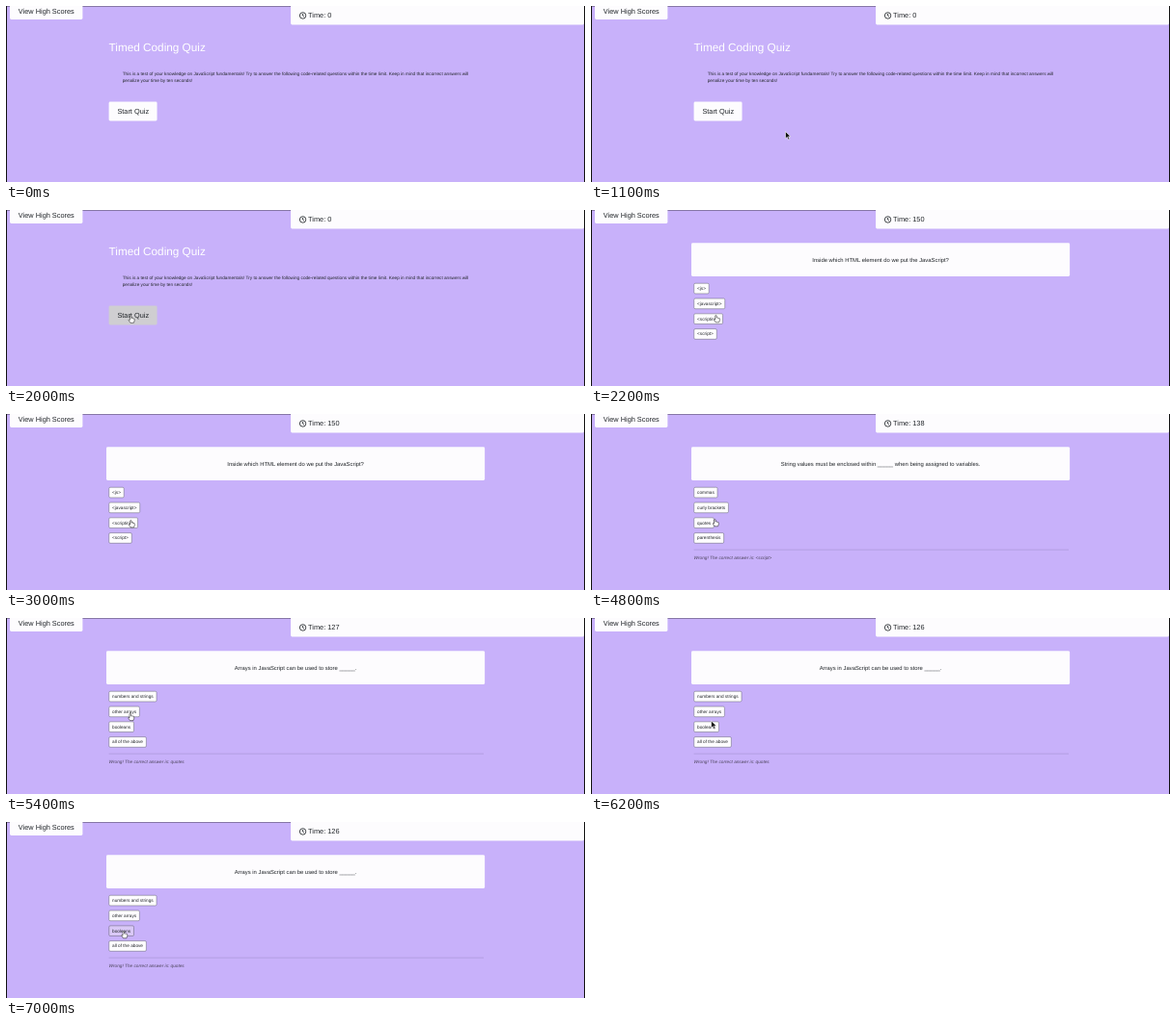
Write an HTML page that moves like this. It is 600x183 px and loops after 7.1 s.

```html
<!DOCTYPE html>
<html lang="en">
<head>
<meta charset="utf-8">
<title>Timed Coding Quiz</title>
<style>
  html, body { margin: 0; width: 100%; height: 100%; overflow: hidden; }
  #stage { position: relative; width: 600px; height: 183px; overflow: hidden; background: #c8b1fa; }
  #stage * { box-sizing: border-box; }
  #stage div, #stage svg { position: absolute; }
  #page {
    left: 0; top: 0; width: 1633px; height: 498px;
    transform: scale(.3675); transform-origin: 0 0;
    color: #212529; font: 12.8px/19.2px "Liberation Sans", Arial, sans-serif;
    text-rendering: geometricPrecision; white-space: nowrap;
  }
  #page .big { font-size: 20px; line-height: 30px; }
  .white { background: #fdfcfe; }
  .edge { top: 0; width: 1px; height: 183px; background: #111; }
  #scores { left: 11px; top: -16px; width: 205px; height: 54px; padding: 16px 0 0 24px; border-radius: 4px; }
  #timer { left: 803px; top: -5px; width: 827px; height: 58px; border-radius: 4px; }
  #time { left: 852px; top: 12px; }
  #clock { left: 826px; top: 16px; width: 22px; height: 22px; }
  h1 { position: absolute; left: 290px; top: 99px; margin: 0; font: 32px/38px "Liberation Sans", Arial, sans-serif; color: #fff; }
  #intro p { position: absolute; left: 328.5px; top: 182px; margin: 0; }
  #start { left: 290px; top: 270.5px; width: 136px; height: 54px; padding: 12px 0 0 24px; border-radius: 4px; }
  #card { left: 283px; top: 92.5px; width: 1067px; height: 95px; border-radius: 4px; text-align: center; font-size: 16px; line-height: 100px; }
  .option { left: 290px; height: 30px; padding: 0 8.5px; line-height: 28px; border: 1.5px solid #343a40; border-radius: 4px; }
  .pressed { background: #d9c8f6; }
  #rule { left: 290px; top: 383px; width: 1057px; height: 2px; background: #ab97d8; }
  #note { left: 290px; top: 397px; font-style: italic; color: #4a4258; }
  #cursor { left: 0; top: 0; overflow: visible; width: 10px; height: 12px; }
  #cursor path { fill: #fff; stroke: #222; stroke-width: .65; stroke-linejoin: round; }
  #cursor #arrow { fill: #111; stroke: #fff; stroke-width: .6; }
</style>
</head>
<body>
<div id="stage">
  <div style="left:0;top:0;width:600px;height:1px;background:#0005"></div>
  <div id="page">
    <div id="scores" class="white big">View High Scores</div>
    <div id="timer" class="white"></div>
    <svg id="clock" viewBox="0 0 8 8" fill="none" stroke="#212529" stroke-width=".85">
      <circle cx="4" cy="4" r="3.2"/><path d="M4 2V4.2L5.3 5.1"/>
    </svg>
    <div id="time" class="big"></div>

    <div id="intro">
      <h1>Timed Coding Quiz</h1>
      <p>This is a test of your knowledge on JavaScript fundamentals! Try to answer the following code-related questions within the time limit. Keep in mind that incorrect answers will<br>penalize your time by ten seconds!</p>
      <div id="start" class="big">Start Quiz</div>
    </div>

    <div id="quiz">
      <div id="card" class="white"></div>
      <div id="options"></div>
      <div id="feedback"><div id="rule"></div><div id="note"></div></div>
    </div>
  </div>

  <div class="edge" style="left:0"></div>
  <div class="edge" style="left:599px"></div>
  <svg id="cursor">
    <path id="arrow" d="M0 0V7.4L1.8 5.8L3 8.6L4.3 8L3.1 5.3H5.4Z"/>
    <path id="hand" transform="translate(.2 .5) scale(.85)" d="M-.9 .4Q0 -.6 .8 .4V3Q1.6 2.4 2.2 3.2Q3 2.7 3.5 3.5Q4.6 3.2 4.6 4.4V6L3.7 8.6H-.4L-2.5 5.4Q-2.6 4.2 -.9 5.2Z"/>
  </svg>
</div>
<script>
const LOOP = 7100, STEP = 100;
const SCALE = .3675, ROW_TOP = 207, ROW_GAP = 42.9, ROW_HEIGHT = 30;
const $ = id => document.getElementById(id);

const questions = [
  { at: 2200, press: 4000, row: 2, text: "Inside which HTML element do we put the JavaScript?",
    options: ["<js>", "<javascript>", "<scripting>", "<script>"] },
  { at: 4100, press: 5300, row: 1, text: "String values must be enclosed within _____ when being assigned to variables.",
    options: ["commas", "curly brackets", "quotes", "parenthesis"], answer: "<script>" },
  { at: 5400, press: 7000, row: 2, text: "Arrays in JavaScript can be used to store _____.",
    options: ["numbers and strings", "other arrays", "booleans", "all of the above"], answer: "quotes" }
];

// time, x, y of the pointer tip on the stage
const path = [
  [500, 537, 174], [800, 375, 140], [1000, 240, 127], [1200, 163, 134],
  [1300, 129, 109.5], [2000, 129, 109.5], [2200, 129.3, 109], [2900, 129.3, 109],
  [3200, 129, 112.2], [4500, 129, 112.2], [4800, 128.2, 109], [5000, 128, 104],
  [5300, 128.6, 98.8], [5800, 128.6, 98.8], [6500, 121.6, 113], [LOOP, 121.6, 113]
];

function pointAt(t) {
  const i = path.findIndex(p => p[0] > t);
  const [t0, x0, y0] = path[i - 1], [t1, x1, y1] = path[i];
  const k = (t - t0) / (t1 - t0);
  return [x0 + (x1 - x0) * k, y0 + (y1 - y0) * k];
}

const rows = [0, 1, 2, 3].map(i => {
  const el = document.createElement("div");
  el.style.top = ROW_TOP + i * ROW_GAP + "px";
  return $("options").appendChild(el);
});

const show = (id, on) => $(id).style.display = on ? "" : "none";

function drawQuiz(t) {
  const index = questions.findLastIndex(q => t >= q.at);
  show("intro", index < 0);
  show("quiz", index >= 0);
  if (index < 0) {
    $("time").textContent = "Time: 0";
    return;
  }
  const q = questions[index];
  const seconds = Math.floor((t - 2200) / 1000);
  $("time").textContent = "Time: " + (150 - seconds - 10 * index);
  $("card").textContent = q.text;
  rows.forEach((el, i) => {
    el.textContent = q.options[i];
    el.className = "option " + (i === q.row && t >= q.press ? "pressed" : "white");
  });
  show("feedback", q.answer);
  $("note").textContent = "Wrong! The correct answer is: " + q.answer;
}

function drawCursor(t) {
  show("cursor", t >= 500);
  if (t < 500) return;
  const [x, y] = pointAt(t);
  const overRow = (y / SCALE - ROW_TOP) % ROW_GAP < ROW_HEIGHT;
  const hand = t >= 1300 && (t < 2200 || overRow);
  $("cursor").style.transform = `translate(${x}px, ${y}px)`;
  show("hand", hand);
  show("arrow", !hand);
}

function draw(t) {
  const hover = Math.min(1, Math.max(0, (t - 1200) / 300));
  const mix = (a, b) => a + (b - a) * hover;
  $("start").style.background = `rgb(${mix(253, 207)}, ${mix(252, 206)}, ${mix(254, 209)})`;
  drawQuiz(t);
  drawCursor(t);
}

let last = -1;
const begin = performance.now();
function tick() {
  const t = Math.floor((performance.now() - begin) % LOOP / STEP) * STEP;
  if (t !== last) draw(last = t);
  requestAnimationFrame(tick);
}
tick();
</script>
</body>
</html>
```
